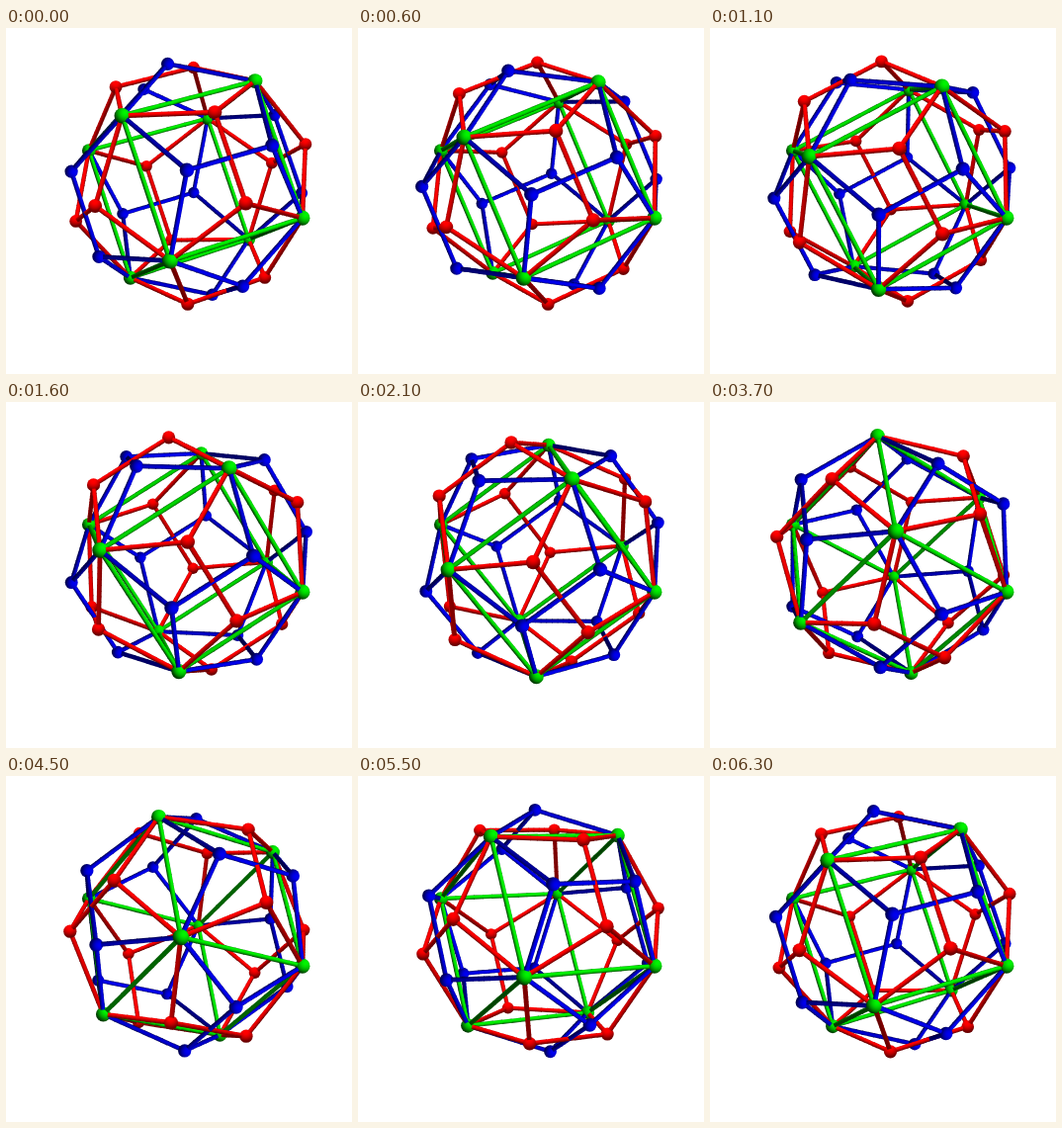
An HTML page with a canvas for the animation above (6.4 s loop, 350 px wide and 350 px high).

```html
<!DOCTYPE html>
<html>
<head>
<meta charset="utf-8">
<style>
  html, body { margin: 0; width: 100%; height: 100%; overflow: hidden; background: #fff; }
  canvas { display: block; }
</style>
</head>
<body>
<canvas id="stage" width="350" height="350"></canvas>
<script>
const ctx = document.getElementById('stage').getContext('2d');
const CENTER = [186.8, 156.5], EYE = 1004, HALF = 70.7;
const STEPS = 64, STEP_MS = 100, SEGMENTS = 12, TUBE = 4.4;
const PHI = (1 + Math.sqrt(5)) / 2;
const RED = 0, GREEN = 1, BLUE = 2;

const add = (a, b, k = 1) => a.map((v, i) => v + k * b[i]);
const dot = (a, b) => a[0] * b[0] + a[1] * b[1] + a[2] * b[2];
const cross = (a, b) => [a[1] * b[2] - a[2] * b[1], a[2] * b[0] - a[0] * b[2], a[0] * b[1] - a[1] * b[0]];
const unit = a => a.map(v => v / Math.hypot(...a));

// Screen axes: x right, y down, z towards the viewer.
const AXIS = unit([0.8806, 0.2777, 0.3846]);
const tilt = [0.3857, 0.0473, -0.9214];
const SIDE = unit(add(tilt, AXIS, -dot(tilt, AXIS)));
const UP = cross(AXIS, SIDE);

// Tinted lights: rgb strength and direction.
const AMBIENT = [0.4, 0.2, 0.2];
const LIGHTS = [
  { rgb: [0, 0.18, 0.5], dir: unit([1.5, 0.5, 1.5]) },
  { rgb: [0.18, 0.5, 0.18], dir: unit([1.5, -1.5, 2.5]) },
  { rgb: [0.5, 0.18, 0], dir: unit([-0.5, -1.5, 1.5]) },
  { rgb: [0, 0, 0.18], dir: unit([-0.5, 0.5, 1.5]) }
];
const BRIGHTEST = AMBIENT.map((_, c) =>
  unit(LIGHTS.reduce((sum, light) => add(sum, light.dir, light.rgb[c]), [0, 0, 0])));

function shade(color, normal) {
  const level = LIGHTS.reduce((sum, light) =>
    sum + light.rgb[color] * Math.max(0, dot(normal, light.dir)), AMBIENT[color]);
  const rgb = [0, 0, 0];
  rgb[color] = Math.round(255 * Math.min(1, level));
  return `rgb(${rgb.join()})`;
}

// A cube and the two dodecahedra that share its corners.
const balls = [], edges = [];
const signs = [-1, 1];
for (const x of signs) for (const y of signs) for (const z of signs)
  balls.push({ pos: [x, y, z], color: GREEN, radius: 7.2 });
for (const [color, first, second] of [[RED, 1 / PHI, PHI], [BLUE, PHI, 1 / PHI]])
  for (let k = 0; k < 3; k++) for (const s of signs) for (const t of signs) {
    const pos = [0, 0, 0];
    pos[k] = s * first;
    pos[(k + 1) % 3] = t * second;
    balls.push({ pos, color, radius: 6.4 });
  }

function link(color, length) {
  const group = balls.filter(b => b.color === color || b.color === GREEN);
  group.forEach((a, i) => group.slice(i + 1).forEach(b => {
    if (Math.abs(Math.hypot(...add(a.pos, b.pos, -1)) - length) < 0.01) edges.push({ a, b, color });
  }));
}
link(GREEN, 2);
link(RED, 2 / PHI);
link(BLUE, 2 / PHI);

function project(p) {
  const scale = EYE / (EYE - p[2]);
  return { x: CENTER[0] + p[0] * scale, y: CENTER[1] + p[1] * scale, scale };
}

function drawBall({ at, color, radius }) {
  const { x, y, scale } = project(at), r = radius * scale;
  const [hx, hy] = BRIGHTEST[color], off = Math.hypot(hx, hy), reach = 1 + off;
  const cx = x + hx * r, cy = y + hy * r;
  const fill = ctx.createRadialGradient(cx, cy, 0, cx, cy, reach * r);
  for (let i = 0; i <= 8; i++) {
    const along = off - reach * i / 8;
    const depth = Math.sqrt(Math.max(0, 1 - along * along));
    fill.addColorStop(i / 8, shade(color, [hx / off * along, hy / off * along, depth]));
  }
  ctx.fillStyle = fill;
  ctx.beginPath();
  ctx.arc(x, y, r, 0, 2 * Math.PI);
  ctx.fill();
}

function drawTube(from, to, dir, color) {
  const p = project(from), q = project(to);
  const flat = Math.hypot(dir[0], dir[1]) || 1e-6;
  const front = [-dir[2] * dir[0] / flat, -dir[2] * dir[1] / flat, flat];
  const edge = [-dir[1] / flat, dir[0] / flat, 0];
  const width = TUBE * (p.scale + q.scale) / 2, w = width / 2;
  const mx = (p.x + q.x) / 2, my = (p.y + q.y) / 2;
  const stroke = ctx.createLinearGradient(mx - edge[0] * w, my - edge[1] * w, mx + edge[0] * w, my + edge[1] * w);
  for (const s of [-1, -0.8, -0.4, 0, 0.4, 0.8, 1]) {
    const normal = add(front.map(v => v * Math.sqrt(1 - s * s)), edge, s);
    stroke.addColorStop((s + 1) / 2, shade(color, normal));
  }
  const len = Math.hypot(q.x - p.x, q.y - p.y) || 1e-6;
  const ox = (q.x - p.x) / len * 0.4, oy = (q.y - p.y) / len * 0.4;
  ctx.strokeStyle = stroke;
  ctx.lineWidth = width;
  ctx.beginPath();
  ctx.moveTo(p.x - ox, p.y - oy);
  ctx.lineTo(q.x + ox, q.y + oy);
  ctx.stroke();
}

function draw(step) {
  const turn = -(step - 45) * 2 * Math.PI / 3 / STEPS;
  const frame = [0, 1, 2].map(k => {
    const angle = turn + k * 2 * Math.PI / 3;
    const ring = add(SIDE.map(v => v * Math.cos(angle)), UP, Math.sin(angle));
    return add(AXIS.map(v => v / Math.sqrt(3)), ring, Math.sqrt(2 / 3));
  });
  const parts = [];
  for (const ball of balls) {
    ball.at = [0, 1, 2].map(i => HALF * ball.pos.reduce((sum, v, k) => sum + v * frame[k][i], 0));
    parts.push({ z: ball.at[2], paint: () => drawBall(ball) });
  }
  for (const { a, b, color } of edges) {
    const dir = unit(add(b.at, a.at, -1));
    const start = add(a.at, dir, a.radius * 0.9), end = add(b.at, dir, -b.radius * 0.9);
    const span = add(end, start, -1);
    for (let i = 0; i < SEGMENTS; i++) {
      const from = add(start, span, i / SEGMENTS), to = add(start, span, (i + 1) / SEGMENTS);
      parts.push({ z: (from[2] + to[2]) / 2, paint: () => drawTube(from, to, dir, color) });
    }
  }
  ctx.fillStyle = '#fff';
  ctx.fillRect(0, 0, 350, 350);
  parts.sort((m, n) => m.z - n.z).forEach(part => part.paint());
}

let shown = -1;
function tick() {
  const step = Math.floor(performance.now() / STEP_MS) % STEPS;
  if (step !== shown) draw(shown = step);
  requestAnimationFrame(tick);
}
tick();
</script>
</body>
</html>
```
